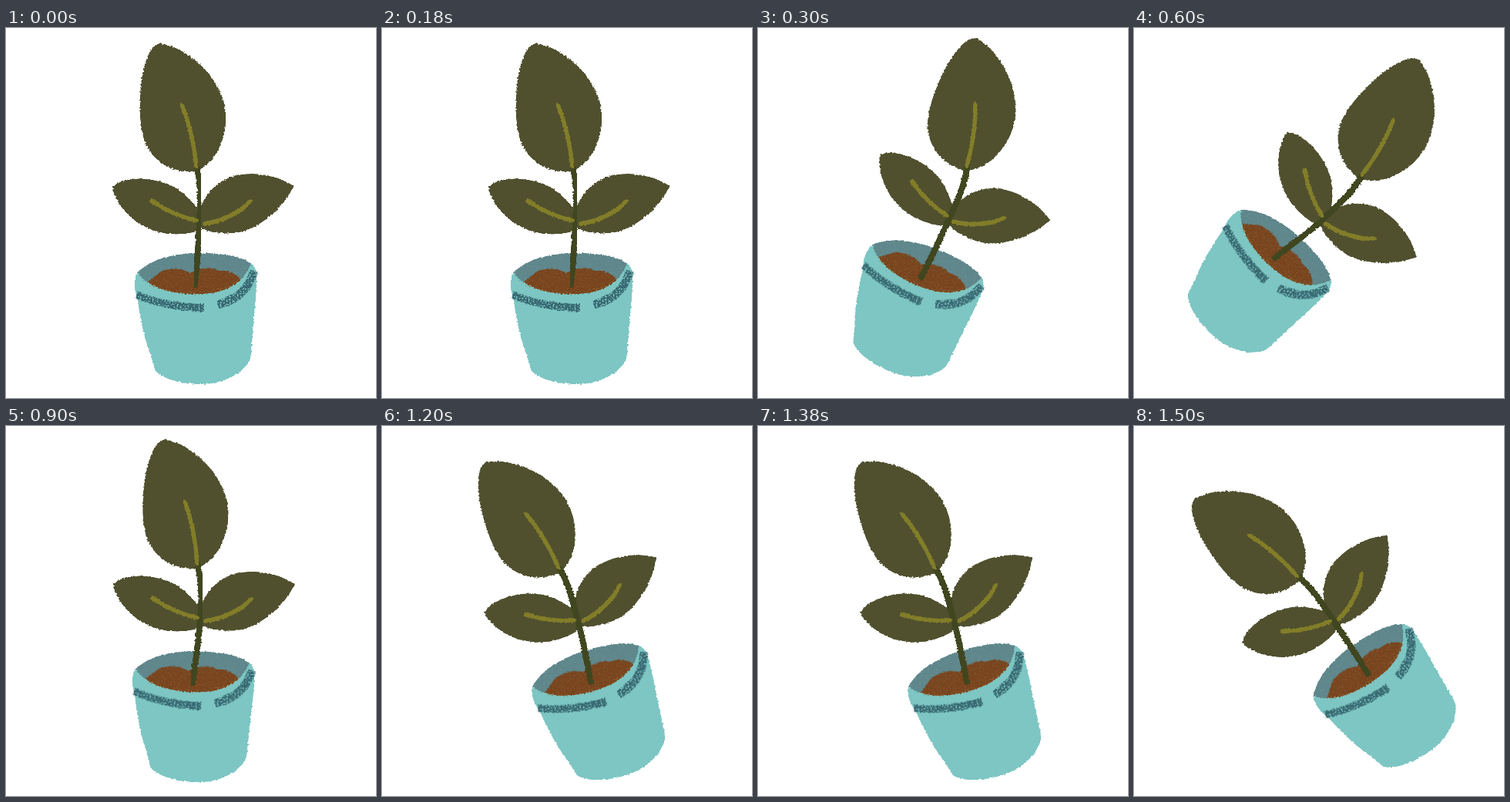
An HTML page that plays this animation: 480 by 480 pixels, repeating every 1800 ms.

```html
<!DOCTYPE html>
<html lang="en">
<head>
<meta charset="utf-8">
<title>Swaying potted plant</title>
<style>
  html, body { margin: 0; width: 100%; height: 100%; overflow: hidden; background: #fff; }
  svg { display: block; width: 100%; height: 100%; }
  .leaf { fill: #50502f; }
  .line { fill: none; stroke-linecap: round; stroke-linejoin: round; }
  .vein { stroke: #827d28; stroke-width: 5.5; }
  .stem { stroke: #40461f; stroke-width: 8; }
  .band { stroke: #386a73; stroke-linecap: butt; }
</style>
</head>
<body>
<svg viewBox="0 0 480 480">
  <defs>
    <!-- crayon edge -->
    <filter id="rough" x="-10%" y="-10%" width="120%" height="120%" color-interpolation-filters="sRGB">
      <feTurbulence type="fractalNoise" baseFrequency=".4" numOctaves="2" seed="4"/>
      <feDisplacementMap in="SourceGraphic" scale="3.5" xChannelSelector="R" yChannelSelector="G"/>
      <feComponentTransfer><feFuncA type="linear" slope="2" intercept="-.5"/></feComponentTransfer>
    </filter>
    <!-- sparse dots -->
    <filter id="specks" x="-10%" y="-10%" width="120%" height="120%" color-interpolation-filters="sRGB">
      <feTurbulence type="fractalNoise" baseFrequency=".6" numOctaves="2" seed="9"/>
      <feColorMatrix values="0 0 0 0 0  0 0 0 0 0  0 0 0 0 0  12 0 0 0 -7.2"/>
      <feComposite in="SourceGraphic" operator="in"/>
    </filter>
    <!-- dense chalk -->
    <filter id="chalk" x="-10%" y="-30%" width="120%" height="160%" color-interpolation-filters="sRGB">
      <feTurbulence type="fractalNoise" baseFrequency=".5" numOctaves="2" seed="2" result="n"/>
      <feColorMatrix values="0 0 0 0 0  0 0 0 0 0  0 0 0 0 0  7 0 0 0 -2.4" result="m"/>
      <feDisplacementMap in="SourceGraphic" in2="n" scale="5" xChannelSelector="R" yChannelSelector="G"/>
      <feComposite in2="m" operator="in"/>
    </filter>
    <path id="mouth" d="M170 318C184 302 215 292 250 292C284 292 310 297 321 308L312 330L285 344L246 349L205 343L176 333Z"/>
    <path id="dirt" d="M180 330C188 329 194 319 203 315C217 310 229 312 239 318C249 311 266 309 277 315C288 314 297 319 304 325C300 340 270 349 246 349C220 349 195 344 180 330Z"/>
  </defs>

  <g id="pot">
    <g filter="url(#rough)">
      <use href="#mouth" fill="#5f868b"/>
      <use href="#dirt" fill="#79441d"/>
    </g>
    <use href="#mouth" fill="#7dc3c2" opacity=".22" filter="url(#specks)"/>
    <use href="#dirt" fill="#8a481b" opacity=".4" filter="url(#specks)"/>
    <g filter="url(#rough)">
      <path fill="#7dc6c3" d="M171 317C177 327 190 336 210 341C230 346 255 347 276 342C298 336 311 323 318 305L325 315C326 340 322 365 320 395C319 410 319 422 316 432C302 452 280 462 250 462C226 461 205 456 194 445C188 425 181 407 177 388C173 370 172 358 169 346C166 335 166 324 171 317Z"/>
    </g>
    <path class="line" d="M186 332Q214 344 248 345Q288 341 304 325" stroke="#96662f" stroke-width="4" filter="url(#specks)"/>
    <g class="line" filter="url(#chalk)">
      <path class="band" stroke-width="10" d="M169 346Q207 362 257 363"/>
      <path class="band" stroke-width="11" d="M275 359Q312 350 322 315"/>
    </g>
  </g>

  <g id="left" filter="url(#rough)">
    <path class="leaf" d="M138 206C149 195 175 193 200 199C225 205 245 227 254 243L253 262C235 269 205 270 185 260C158 248 141 225 138 206Z"/>
  </g>
  <g id="right" filter="url(#rough)">
    <path class="leaf" d="M373 205C350 189 315 185 290 194C270 201 254 222 250 240L251 259C270 268 300 270 322 258C345 246 365 224 373 205Z"/>
  </g>
  <g id="top" filter="url(#rough)">
    <path class="leaf" d="M200 20C188 20 178 45 175 75C172 105 174 135 182 152C195 178 220 188 245 186C265 181 288 150 285 110C283 70 240 26 200 20Z"/>
  </g>

  <g filter="url(#rough)"><path id="stem" class="line stem"/></g>

  <g id="leftVein" filter="url(#rough)"><path class="line vein" d="M189 224Q214 242 247 250"/></g>
  <g id="rightVein" filter="url(#rough)"><path class="line vein" d="M317 225Q294 248 258 254"/></g>
  <g id="topVein" filter="url(#rough)"><path class="line vein" d="M228 100Q243 136 247 180"/></g>
</svg>

<script>
const STEP = 300;

// Rest points the parts turn around.
const rest = { pot: [245, 333], joint: [251, 252], top: [248, 182] };

// One row per pose: points and angles of each part.
const poses = [
  { pot: [245, 333, 0],     joint: [251, 252], left: 0,     right: 0,   top: [248, 182, 0] },
  { pot: [212, 323, 21.4],  joint: [248, 247], left: 20.7,  right: 22,  top: [271, 182, 21] },
  { pot: [183, 298, 42.5],  joint: [245, 248], left: 45.5,  right: 43,  top: [295, 193, 43] },
  { pot: [242, 333, 1.5],   joint: [252, 251], left: 0,     right: 0.6, top: [249, 181, 2] },
  { pot: [271, 332, -16.5], joint: [254, 253], left: -17,   right: -18, top: [231, 186, -18] },
  { pot: [303, 321, -34.5], joint: [259, 253], left: -35.5, right: -37, top: [214, 196, -36.3] }
];

const el = id => document.getElementById(id);

function place(id, [px, py], x, y, angle) {
  el(id).setAttribute("transform",
    `translate(${x} ${y}) rotate(${angle}) translate(${-px} ${-py})`);
}

// Point at an offset that turns with the plant.
function offset([x, y], dx, dy, angle) {
  const a = angle * Math.PI / 180, c = Math.cos(a), s = Math.sin(a);
  return [x + dx * c - dy * s, y + dx * s + dy * c];
}

function stemPath({ pot, joint, top }) {
  const a = top[2];
  return `M${top[0]} ${top[1]}C` + [
    offset(top, 5, 20, a), offset(joint, 2, -26, a), joint,
    offset(joint, -1, 28, a), offset(pot, 3, -28, a), pot.slice(0, 2)
  ].join(" ");
}

function show(pose) {
  place("pot", rest.pot, ...pose.pot);
  for (const side of ["left", "right"])
    for (const id of [side, side + "Vein"])
      place(id, rest.joint, ...pose.joint, pose[side]);
  for (const id of ["top", "topVein"]) place(id, rest.top, ...pose.top);
  el("stem").setAttribute("d", stemPath(pose));
}

let shown = -1;
function tick() {
  const i = Math.floor(performance.now() / STEP) % poses.length;
  if (i !== shown) show(poses[shown = i]);
  requestAnimationFrame(tick);
}
tick();
</script>
</body>
</html>
```
